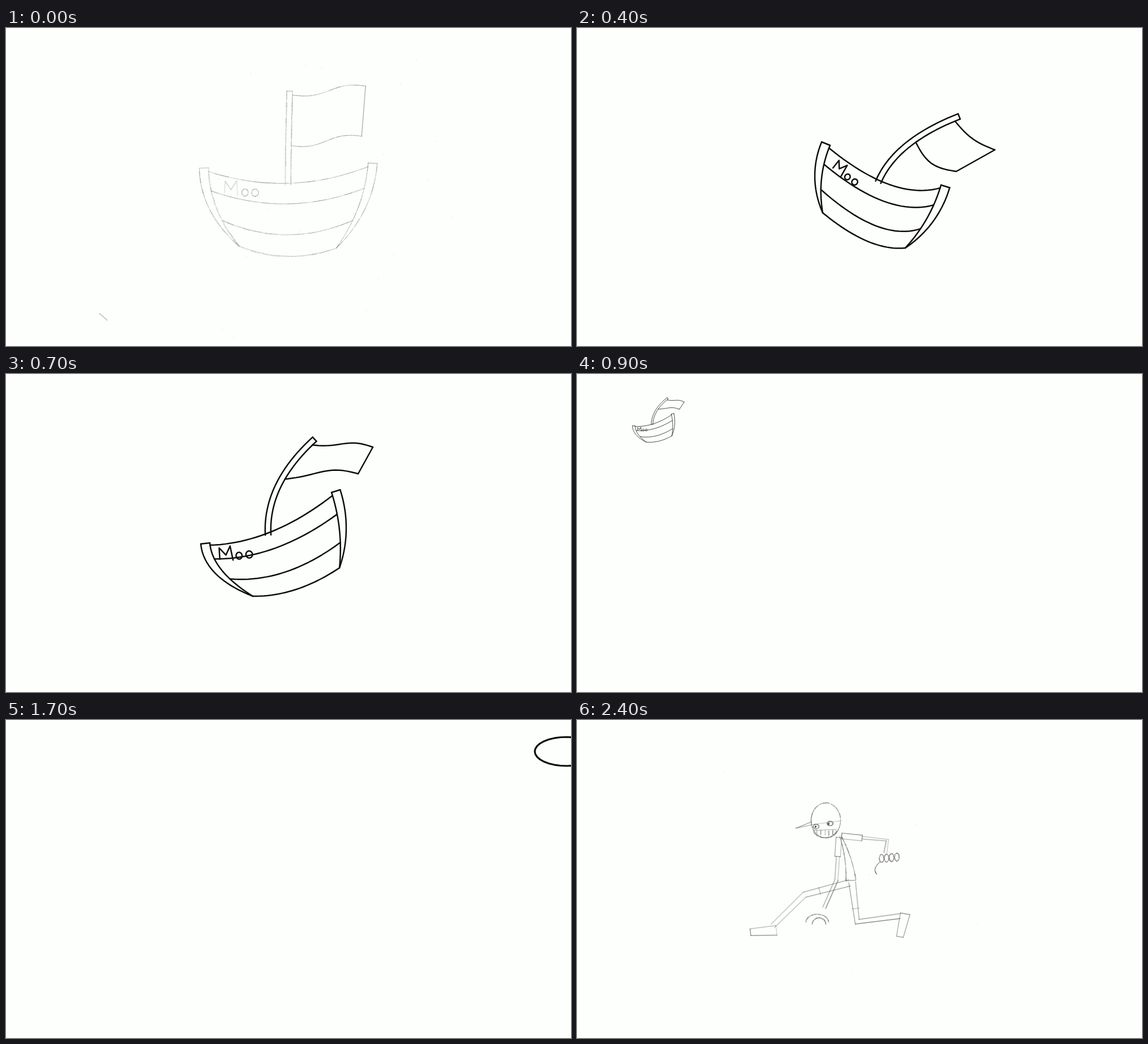
Write an HTML page with a canvas that moves like this. It is 998 by 561 pixels and loops after 2.5 s.

```html
<!DOCTYPE html>
<html lang="en">
<head>
<meta charset="utf-8">
<title>Boat and jumper</title>
<style>
  html, body { margin: 0; width: 100%; height: 100%; overflow: hidden; background: #fdfffc; }
  canvas { display: block; width: 998px; height: 561px; }
</style>
</head>
<body>
<canvas id="stage" width="998" height="561"></canvas>
<script>
const ctx = document.getElementById('stage').getContext('2d');
const LOOP = 2500, STEP = 100, TAU = Math.PI * 2;

// ---- geometry: a stroke is a list of points ----

// Blends numbers, points and whole poses
function mix(a, b, k) {
  if (typeof a === 'number') return a + (b - a) * k;
  if (Array.isArray(a)) return a.map((v, i) => mix(v, b[i], k));
  return Object.fromEntries(Object.keys(a).map(key => [key, mix(a[key], b[key], k)]));
}

const steps = (n, f) => Array.from({ length: n + 1 }, (_, i) => f(i / n));
const add = (p, x, y) => [p[0] + x, p[1] + y];

// Curve that passes through m halfway from a to b
const bend = (a, m, b) => steps(24, u => [0, 1].map(i =>
  a[i] * (1 - u) * (1 - 2 * u) + m[i] * 4 * u * (1 - u) + b[i] * u * (2 * u - 1)));

const at = (path, u) => path[Math.round(u * (path.length - 1))];

const oval = ([x, y], rx, ry, from = 0, to = TAU) => steps(32, u => {
  const a = from + (to - from) * u;
  return [x + rx * Math.cos(a), y + ry * Math.sin(a)];
});

function normal(a, b) {
  const dx = b[0] - a[0], dy = b[1] - a[1], len = Math.hypot(dx, dy) || 1;
  return [-dy / len, dx / len];
}

// Runs beside a path at a distance that may change along it
function beside(path, dist) {
  const last = path.length - 1;
  return path.map((p, i) => {
    const n1 = normal(path[Math.max(i - 1, 0)], path[Math.max(i, 1)]);
    const n2 = normal(path[Math.min(i, last - 1)], path[Math.min(i + 1, last)]);
    const nx = n1[0] + n2[0], ny = n1[1] + n2[1];
    const d = dist(i / last) / (Math.hypot(nx, ny) || 1);
    return add(p, nx * d, ny * d);
  });
}

const ribbon = (path, width) => [
  beside(path, u => width(u) / 2),
  beside(path, u => -width(u) / 2)
];

// ---- boat ----

const calm = {
  left: [[358, 247], [372, 317], [412, 385]],
  right: [[640, 238], [623, 315], [584, 388]],
  sag: [0, 25],
  mast: [[498, 277], [499, 194], [501, 111]],
  hoist: 0.41, fly: [[635, 102], [628, 191]], wave: 5, belly: 0,
  name: [398, 282], size: 24, turn: 0.03
};
const rocked = {
  left: [[447, 207], [432, 265], [434, 326]],
  right: [[643, 277], [618, 336], [580, 388]],
  sag: [8, 29],
  mast: [[532, 272], [583, 207], [675, 156]],
  hoist: 0.59, fly: [[738, 215], [670, 253]], wave: 0, belly: 14,
  name: [465, 246], size: 20, turn: 0.61
};
const pulled = {
  left: [[360, 298], [381, 346], [436, 392]],
  right: [[575, 209], [589, 275], [589, 342]],
  sag: [0, 20],
  mast: [[463, 284], [481, 197], [545, 115]],
  hoist: 0.57, fly: [[648, 129], [622, 176]], wave: 3, belly: -8,
  name: [388, 316], size: 23, turn: -0.12
};

function hull({ left, right, sag }) {
  const post = u => 16 * (1 - u * u);
  const [l, r] = [bend(...left), bend(...right)];
  const outer = [beside(l, post), beside(r, u => -post(u))];
  const planks = [0.05, 0.31, 0.67, 1].map(u => {
    const [a, b] = [at(l, u), at(r, u)];
    const k = u === 1 ? 0.65 : 1;
    return bend(a, add(mix(a, b, 0.5), sag[0] * k, sag[1] * k), b);
  });
  return [l, r, ...outer, [l[0], outer[0][0]], [r[0], outer[1][0]], ...planks];
}

function cloth(a, b, wave, belly) {
  const n = normal(a, b);
  return steps(20, u => {
    const d = wave * Math.sin(TAU * u) + belly * Math.sin(Math.PI * u);
    return add(mix(a, b, u), n[0] * d, n[1] * d);
  });
}

function rig({ mast, hoist, fly, wave, belly }) {
  const [lee, wind] = ribbon(bend(...mast), () => 10);
  return [lee, wind, [at(lee, 1), at(wind, 1)],
    cloth(at(lee, 0.96), fly[0], wave, belly / 2),
    cloth(at(lee, hoist), fly[1], wave, belly), fly];
}

// Hand-drawn lettering that tilts with the planks
function lettering({ name, size, turn }) {
  const c = Math.cos(turn) * size, s = Math.sin(turn) * size;
  const place = ([x, y]) => add(name, x * c - y * s, x * s + y * c);
  const m = [[-0.5, 0.4], [-0.45, -0.45], [0, 0.15], [0.4, -0.5], [0.5, 0.6]];
  return [m, oval([1, 0.32], 0.23, 0.26), oval([1.78, 0.32], 0.25, 0.27)].map(p => p.map(place));
}

const boat = p => [...hull(p), ...rig(p), ...lettering(p)];

// ---- figure: limbs are lists of joints ----

const crouch = {
  head: [442.5, 218], skull: [27.5, 27],
  brim: [[461, 203], [436, 223], [404, 244], [417, 222]],
  eyes: [[440, 222], [424, 234]],
  spine: [[470, 235], [494, 259], [508, 293]],
  nearArm: [[470, 238], [459, 290], [439, 307]],
  farArm: [[464, 247], [430, 288], [412, 307]],
  frontLeg: [[498, 294], [442, 309], [408, 346]], frontToe: [379, 341],
  backLeg: [[512, 293], [473, 328], [538, 293]], backToe: [549, 322]
};
const lunge = {
  head: [440, 177], skull: [26, 31],
  brim: [[466, 178], [420, 184], [387, 191], [414, 180]],
  eyes: [[447, 183], [423, 188]],
  spine: [[465, 204], [478, 243], [484, 283]],
  nearArm: [[468, 204], [548, 212], [543, 244]],
  farArm: [[463, 207], [458, 282], [428, 350]],
  frontLeg: [[482, 287], [402, 308], [346, 363]], frontToe: [306, 368],
  backLeg: [[486, 286], [495, 356], [571, 346]], backToe: [565, 382]
};

function arm([shoulder, elbow, hand]) {
  const cuff = mix(shoulder, elbow, 0.45), wrist = mix(elbow, hand, 0.72);
  const [a, b] = ribbon([shoulder, cuff], () => 10);
  return [[...a, b[1], b[0], a[0]], ...ribbon([cuff, elbow, wrist], () => 6)];
}

function leg([hip, knee, ankle], toe) {
  const n = normal(ankle, toe);
  const sole = (p, d) => add(p, -n[0] * d, -n[1] * d);
  const heel = mix(ankle, toe, -0.14);
  return [...ribbon([hip, knee, ankle], u => 11 - 3 * u),
    [heel, sole(heel, 17), sole(toe, 12), toe, heel]];
}

function figure(p) {
  const body = ribbon(bend(...p.spine), u => 3 + 15 * u);
  return [
    oval(p.head, ...p.skull), p.brim,
    ...p.eyes.flatMap(e => [oval(e, 5, 4), oval(add(e, -2, 0.5), 1, 1)]),
    ...body, body.map(side => at(side, 1)),
    ...arm(p.nearArm), ...arm(p.farArm),
    ...leg(p.frontLeg, p.frontToe), ...leg(p.backLeg, p.backToe)
  ];
}

const fists = p => [oval(p.nearArm[2], 9.5, 8.5), oval(p.farArm[2], 8, 7)];

// Grin, trouser cuffs and open hands
function details(p) {
  const mouth = add(p.head, -2, 18), near = p.nearArm[2], far = p.farArm[2];
  const teeth = steps(4, u => [add(mouth, u * 28 - 14, 0), add(mouth, u * 28 - 14, 8)]);
  const cuffs = [p.frontLeg, p.backLeg].map(([hip, knee]) =>
    ribbon([mix(hip, knee, 0.66), knee], () => 13).map(side => side[0]));
  const fingers = steps(3, u => oval(add(near, u * 27 - 5, u * -2), 4, 7));
  return [
    oval(mouth, 20, 12, 0, Math.PI), [add(mouth, -20, 0), add(mouth, 20, -2)],
    ...teeth, ...cuffs, ...fingers,
    bend(add(near, -8, 6), add(near, -17, 18), add(near, -14, 28)),
    oval(add(far, -4, 7), 20, 14, Math.PI, TAU),
    oval(add(far, -1, 10), 12, 11, Math.PI, TAU)
  ];
}

const inked = p => [...figure(p), ...fists(p)];
const finished = [...figure(lunge), ...details(lunge)];

// ---- drawing ----

function ink(strokes, width = 2.5) {
  ctx.strokeStyle = '#0c0c0c';
  ctx.lineWidth = width;
  for (const s of strokes) {
    ctx.beginPath();
    s.forEach(p => ctx.lineTo(...p));
    ctx.stroke();
  }
}

// Moves a drawing so that its pivot lands on (x, y)
function inkAt(strokes, pivot, x, y, scale, turn) {
  ctx.save();
  ctx.translate(x, y);
  ctx.rotate(turn);
  ctx.scale(scale, scale);
  ctx.translate(-pivot[0], -pivot[1]);
  ink(strokes);
  ctx.restore();
}

// Two loose grey passes of uneven pressure, and paper dust
function pencil(strokes, seed, dark) {
  const rnd = () => (seed = (seed * 16807) % 2147483647) / 2147483647;
  ctx.strokeStyle = '#505050';
  for (const s of [...strokes, ...strokes]) {
    const dx = rnd() * 1.6 - 0.8, dy = rnd() * 1.6 - 0.8;
    for (let i = 1; i < s.length; i++) {
      ctx.globalAlpha = dark * (0.4 + rnd());
      ctx.lineWidth = 0.7 + rnd() * 0.6;
      ctx.beginPath();
      ctx.moveTo(...add(s[i - 1], dx, dy));
      ctx.lineTo(...add(s[i], dx, dy));
      ctx.stroke();
    }
  }
  ctx.globalAlpha = 1;
  ctx.fillStyle = '#ccc';
  for (let i = 0; i < 7; i++) ctx.fillRect(205 + rnd() * 600, 50 + rnd() * 500, 1, 1);
}

function boatSketch() {
  pencil([...hull(calm), ...rig(calm)], 1117, 0.26);
  pencil(lettering(calm), 4099, 0.2);
  ink([]);
  pencil([[[165, 503], [179, 515]]], 7001, 0.35);
}

const rock = k => ink(boat(mix(calm, rocked, k)));

// k runs from 0 (in place) to 1 (gone into the distance)
function sail(k) {
  const ease = 1 - (1 - k) ** 2;
  inkAt(boat(pulled), [480, 270], 480 - 385 * ease, 270 - 207 * ease, 1 - 0.8 * ease, 0.12 * k);
}

// k runs from 0 (upper right) to 1 (landed)
function leap(k) {
  const rest = 1 - k;
  inkAt(inked(mix(crouch, lunge, 0.4 * rest)), [465, 275],
    465 + 500 * rest, 275 - 165 * rest, 1 + 0.27 * rest, 0.33 * rest);
}

function scene(n) {
  if (n === 0) boatSketch();
  else if (n <= 3) rock(n / 3 * 0.72);
  else if (n <= 5) rock(1 + 0.2 * (n - 4));
  else if (n <= 7) ink(boat(mix(rocked, pulled, (n - 5) / 2)));
  else if (n <= 10) sail((n - 7) / 3);
  else if (n === 17) ink([oval([990, 55.5], 56, 25.5)], 3.2);
  else if (n >= 18 && n <= 21) leap((n - 17) / 4);
  else if (n === 22) ink(inked(mix(crouch, lunge, 0.7)));
  else if (n === 23) ink(finished, 2);
  else if (n === 24) pencil(finished, 2903, 0.42);
}

ctx.lineCap = ctx.lineJoin = 'round';
let shown = -1;

function draw(now) {
  const n = Math.floor((now % LOOP) / STEP);
  if (n === shown) return;
  shown = n;
  ctx.fillStyle = '#fdfffc';
  ctx.fillRect(0, 0, 998, 561);
  scene(n);
}

const start = performance.now();
function tick() {
  draw(performance.now() - start);
  requestAnimationFrame(tick);
}
tick();
</script>
</body>
</html>
```
